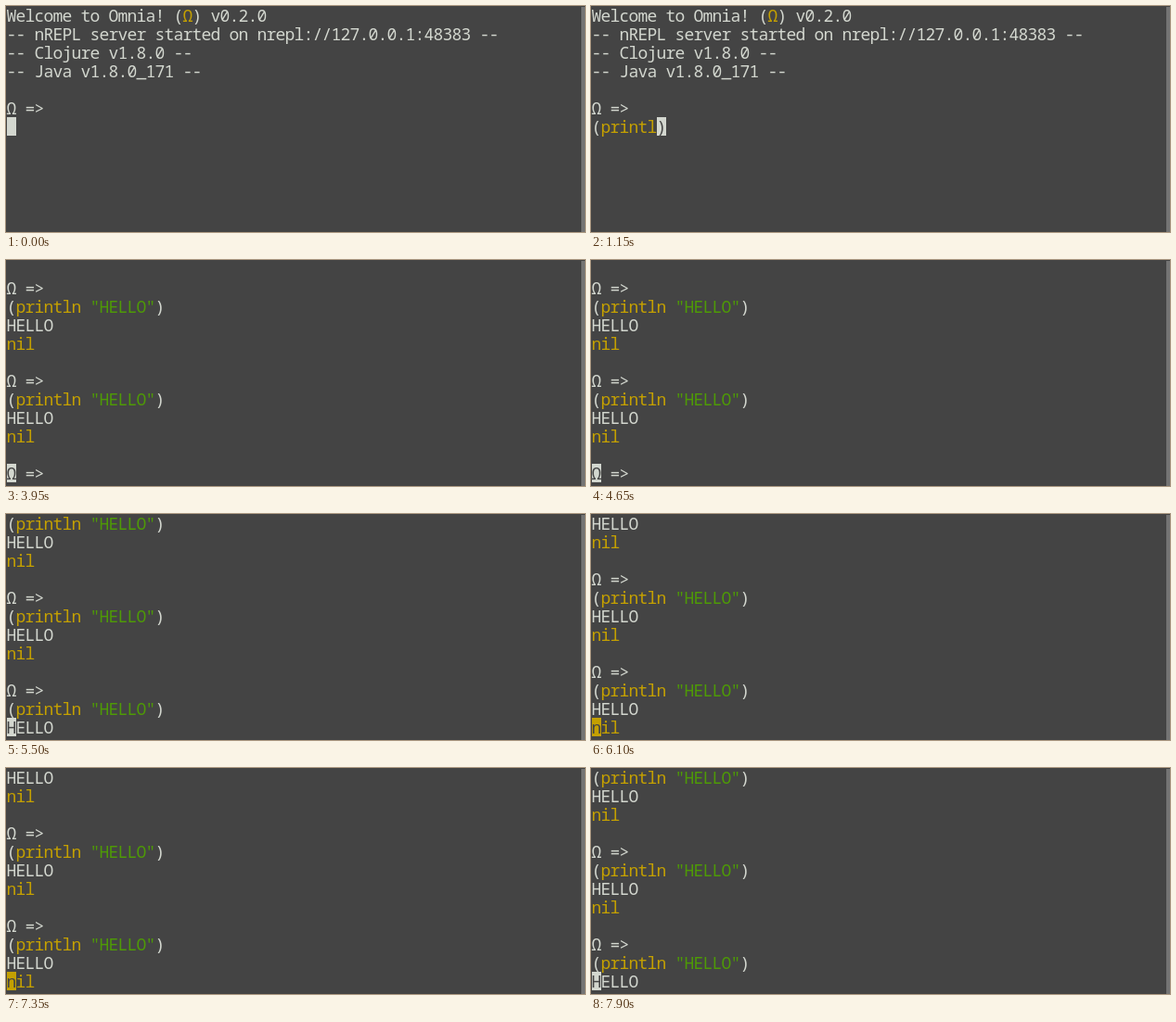
Animation, 624 px wide and 244 px high, one loop 8000 ms. Source, as an HTML page:

```html
<!DOCTYPE html>
<html lang="en">
<head>
<meta charset="utf-8">
<title>REPL session</title>
<style>
  html, body { margin: 0; width: 100%; height: 100%; overflow: hidden; background: #444; }
  #stage { position: relative; width: 624px; height: 244px; overflow: hidden; background: #444; }
  #screen, #cursor {
    position: absolute; margin: 0; white-space: pre; color: #d3d7cf;
    font: 18px/20px "Noto Sans Mono", "DejaVu Sans Mono", monospace;
    font-variant-ligatures: none;
    letter-spacing: calc(10px - 1ch);
    text-indent: -.4px;
  }
  #screen { left: 1px; top: 0; }
  #screen div { height: 20px; }
  #cursor { width: 10px; height: 20px; overflow: hidden; }
  #bar { position: absolute; right: 0; top: 1px; width: 4px; height: 243px; background: #747474; }
  .symbol { color: #c4a000; }
  .string { color: #4e9a06; }
</style>
</head>
<body>
<div id="stage">
  <div id="screen"></div>
  <div id="cursor"></div>
  <div id="bar"></div>
</div>
<script>
const LOOP = 8000, ROWS = 12, CELL = 10, LINE = 20;
const COLORS = { plain: '#d3d7cf', symbol: '#c4a000', string: '#4e9a06' };
const CALL = '(println "HELLO")';
const BANNER = [
  'Welcome to Omnia! (Ω) v0.2.0',
  '-- nREPL server started on nrepl://127.0.0.1:48383 --',
  '-- Clojure v1.8.0 --',
  '-- Java v1.8.0_171 --'
];
const PROMPT = ['', 'Ω =>'];

// Every snapshot holds from its time until the next one.
const snapshots = [];
let state = { time: 0, runs: 0, input: '', col: 0, top: 0 };
const at = (time, change) => snapshots.push(state = { ...state, ...change, time });

// Brackets and quotes close themselves, so the cursor sits before the closers.
const type = (time, text) => {
  const closers = (text.includes('"') ? '"' : '') + ')';
  at(time, { input: text + closers, col: text.length });
};
const recall = time =>
  at(time, { input: CALL, col: CALL.length, top: Math.max(0, 5 * (state.runs - 1)) });
const run = time => {
  const runs = state.runs + 1;
  at(time, { runs, input: '', col: 0, top: runs > 1 ? 5 * runs - 6 : 0 });
};
const scroll = (times, tops) => times.forEach((time, i) => at(time, { top: tops[i] }));

at(0, {});
for (let i = 0; i < 7; i++) type(250 + 150 * i, CALL.slice(0, i + 1));
type(1350, CALL.slice(0, 9));
[1650, 1800, 1950, 2100, 2300, 2450].forEach((t, i) => type(t, CALL.slice(0, 10 + i)));
run(2900);
[[3250, 3500], [3800, 3950], [4300, 4650]].forEach(([up, enter]) => { recall(up); run(enter); });
scroll([5200, 5350, 5500, 5650, 5800, 5950, 6100], [13, 12, 11, 10, 9, 8, 7]);
scroll([6250, 6400, 6550, 6650, 6800, 6950, 7050, 7200], [6, 5, 3, 2, 3, 4, 5, 6]);
scroll([7350, 7500, 7650, 7750, 7900], [7, 8, 9, 10, 11]);

function tokens(line) {
  return line.split(/("[^"]*"|(?<=\()[a-zΩ]+|^nil$)/).filter(Boolean).map(text => ({
    text,
    kind: text[0] === '"' ? 'string' : /^([a-z]+|Ω)$/.test(text) ? 'symbol' : 'plain'
  }));
}

const screen = document.getElementById('screen');
const cursor = document.getElementById('cursor');

function draw({ runs, input, col, top }) {
  const lines = [...BANNER];
  for (let i = 0; i < runs; i++) lines.push(...PROMPT, CALL, 'HELLO', 'nil');
  lines.push(...PROMPT, input);
  const visible = lines.slice(top, top + ROWS).map(tokens);

  screen.replaceChildren(...visible.map(parts => {
    const row = document.createElement('div');
    row.append(...parts.map(({ text, kind }) => {
      const span = document.createElement('span');
      span.className = kind;
      span.textContent = text;
      return span;
    }));
    return row;
  }));

  const row = Math.min(lines.length - 1 - top, ROWS - 1);
  const cells = visible[row].flatMap(({ text, kind }) => [...text].map(char => ({ char, kind })));
  const { char, kind } = cells[col] || { char: '', kind: 'plain' };
  cursor.textContent = char;
  Object.assign(cursor.style, {
    left: 1 + col * CELL + 'px',
    top: row * LINE + 'px',
    background: COLORS[kind],
    color: '#444'
  });
}

let shown;
function tick() {
  const time = performance.now() % LOOP;
  const current = snapshots.findLast(s => s.time <= time);
  if (current !== shown) draw(shown = current);
  requestAnimationFrame(tick);
}
tick();
</script>
</body>
</html>
```
